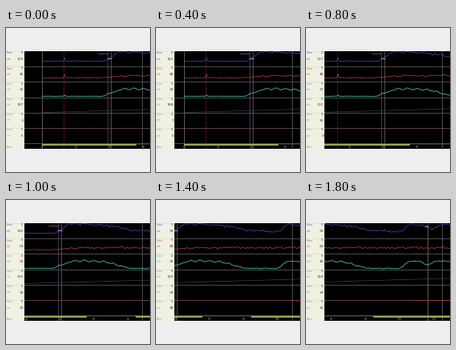
Recreate the animation shown at these times as a matplotlib script. Size 180 by 180 pixels, loop 2000 ms.

```python
import numpy as np
import matplotlib.pyplot as plt
from matplotlib.animation import FuncAnimation
from matplotlib.patches import Rectangle

SIZE = 180
LEFT, TOP, BOTTOM = 22.5, 29, 151
ROW_HEIGHT = 19.2
ROWS = [TOP + ROW_HEIGHT * k for k in range(7)]
PX = 0.72  # points per pixel at 100 dpi
FRAMES = 10
START, END = 45, 330
TICK_STEP = 42.4

rng = np.random.default_rng(4)
fig = plt.figure(figsize=(1.8, 1.8), dpi=100, facecolor="#eeeeee")
ax = fig.add_axes([0, 0, 1, 1])
ax.set(xlim=(0, SIZE), ylim=(SIZE, 0))
ax.axis("off")

plot = Rectangle((LEFT, TOP), SIZE - LEFT, BOTTOM - TOP, color="black", lw=0)
ax.add_patch(plot)
world = np.arange(START, END, 0.5)
scrolling = []


def scroll(frame):
    """Slow start, a quick middle, then a slightly slower finish."""
    return np.interp(frame, [0, 2, 4, 5, 7, 9], [0, 10, 33, 62, 105, 140])


def rolling(x, y, color, width=0.8, z=3, **style):
    line, = ax.plot(x, y, color=color, lw=width * PX, zorder=z,
                    solid_capstyle="butt", **style)
    line.set_clip_path(plot)
    scrolling.append((line, np.asarray(x, float)))


def vertical(x, color, **style):
    rolling([x, x], [TOP, BOTTOM], color, z=2, **style)


def horizontal(x0, x1, y, color, width, **style):
    rolling([x0, x1], [y, y], color, width, **style)


def label(x, y, text, color, px, **style):
    return ax.text(x, y, text, color=color, fontsize=px * PX,
                   family="DejaVu Sans", va="center", **style)


def step(center, width):
    return 0.5 + 0.5 * np.tanh((world - center) / (2 * width))


def bump(center, width):
    return np.exp(-((world - center) / width) ** 2)


def noise(amount):
    kernel = np.hanning(9)
    kernel /= np.sqrt(np.sum(kernel ** 2))
    rough = np.convolve(rng.normal(0, 1, len(world)), kernel, "same")
    return amount * rough * (0.25 + 0.75 * step(138, 4))


def draw_panel():
    ax.add_patch(Rectangle((0, TOP), LEFT, BOTTOM - TOP,
                           color="#f0f1e2", lw=0))
    colors = ["#5757d8", "#d85050", "#43bfc4", "#999999", "#bd8a8a", "#8fae8f"]
    for top, color in zip(ROWS, colors):
        ax.plot([0, LEFT], [top, top], color="#d5d7ca", lw=0.5 * PX)
        label(0.5, top + 2.5, "Chan", color, 3)
        label(0.5, top + 9.5, "unit", color, 2.8)
        label(21.8, top + 2.2, "50", "#555555", 2.6, ha="right")
    label(0.5, 148.5, "Time", "#4da45a", 3)


def draw_grid():
    for y in ROWS[1:]:
        ax.plot([LEFT, SIZE], [y, y], color="#686868", lw=0.7 * PX, zorder=2)
    ax.plot([LEFT, SIZE], [ROWS[5]] * 2, color="#643a37", lw=0.7 * PX, zorder=2)
    ax.plot([170, 170], [TOP, BOTTOM], color="#5f625c", lw=0.8 * PX, zorder=2)


def draw_traces():
    power = (41.4 - 3.4 * step(126, 0.7) - 8.4 * step(135, 2.5)
             + 10.5 * step(206, 12) - 9 * step(264, 2.5) + 5 * bump(297, 6))
    pulse = 62.2 - 2.5 * step(135, 6)
    flow = (85.3 - 3.6 * step(125.5, 0.8) - 5.5 * step(138, 3)
            + 9.3 * step(200, 7) - 9 * step(263, 2) + 4.5 * bump(292, 6))
    ripple = np.sin((world - 151) * 2 * np.pi / 12) * bump(170, 30)
    spike = bump(73, 0.9)

    rolling(world, power - 4 * spike + noise(0.7), "#483fae")
    rolling(world, pulse - 4.5 * spike + noise(0.6), "#a23f3a")
    rolling(world, flow - 1.4 * spike + ripple + noise(0.3), "#4fae9f", 0.9)
    horizontal(START, START + 12, 105.6, "#505050", 0.6)
    rolling([START, END], [105.6, 97.6], "#484848", 0.6)
    horizontal(272, END, 124.6, "#a5372f", 0.8)


def draw_events():
    vertical(START, "#707070")
    vertical(72.2, "#842222", ls=(0, (2, 1)))
    vertical(127, "#673a78")
    vertical(131.3, "#66645a")
    vertical(292, "#77784a")
    horizontal(115, 127, 32, "#a052a8", 0.9, ls=(0, (2, 0.7)))
    horizontal(127, 131.5, 38, "#c9bfe0", 0.8, z=4)
    horizontal(288, 292, 32.5, "#c8c5a0", 0.8, z=4)
    horizontal(163, 224, 144.8, "#315437", 0.6)
    horizontal(START, END, 148.5, "#38503b", 0.6, ls=(0, (1, 3)))
    for x0, x1 in [(START, 163), (224, END)]:
        horizontal(x0, x1, 146, "#bfd559", 1.6, z=4)


draw_panel()
draw_grid()
draw_traces()
draw_events()

ticks = []
for k in range(7):
    x = START + k * TICK_STEP
    tick = label(x, 149.3, str(k * 20), "#a5a5a5", 3.2, ha="center", zorder=4)
    ticks.append((tick, x))

bases = [125, 45, 23, 107, 6, 5]
readouts = [label(22, top + 9.8, "", "#333333", 4.4, ha="right")
            for top in ROWS[:-1]]


def update(frame):
    shift = scroll(frame)
    for line, x in scrolling:
        line.set_xdata(x - shift)
    for tick, x in ticks:
        tick.set_x(x - shift)
        tick.set_visible(LEFT + 2 < x - shift < SIZE + 3)
    for k, (text, base) in enumerate(zip(readouts, bases)):
        change = -shift / 4 if k == 0 else shift / 8
        text.set_text(f"{base + change:.0f}")
    return []


anim = FuncAnimation(fig, update, frames=FRAMES, interval=200,
                     repeat=True, repeat_delay=0)
plt.show()
```
